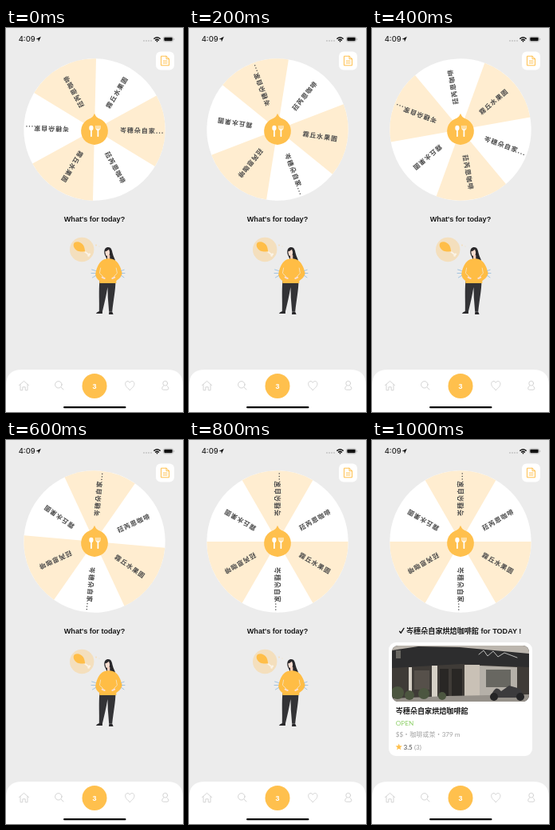
Write an HTML page that moves like this. It is 222 px wide and 480 px high and loops after 1.2 s.

```html
<!DOCTYPE html>
<html lang="zh-Hant">
<head>
<meta charset="utf-8">
<title>What's for today?</title>
<style>
html, body { margin: 0; width: 100%; height: 100%; overflow: hidden; background: #ececec; }
svg { display: block; width: 100vw; height: 100vh; }
text { font-family: "Liberation Sans", "Noto Sans CJK TC", "Noto Sans CJK", sans-serif; }
.label { font-size: 8px; font-weight: 700; letter-spacing: .95px; fill: #484848;
  font-family: "Noto Sans CJK TC", "Noto Sans CJK", sans-serif; }
.bold { font-size: 9.1px; font-weight: 700; fill: #1a1a1a; }
.info { font-size: 8.1px; font-family: Lato, "Noto Sans CJK TC", "Noto Sans CJK", sans-serif; }
.line { fill: none; stroke-linecap: round; stroke-linejoin: round; }
</style>
</head>
<body>
<svg viewBox="0 0 222 480">
  <defs>
    <clipPath id="photoClip"><rect x="25" y="257" width="172" height="70" rx="8"/></clipPath>
  </defs>
  <rect width="222" height="480" fill="#ececec"/>

  <!-- status bar -->
  <text x="15.7" y="17.3" font-size="9.4" fill="#222" style="font-family:Inter,sans-serif;font-weight:500">4:09</text>
  <path d="M43.8 10.8L37.4 13.9L40.4 14.3L40.9 17.2Z" fill="#111"/>
  <g fill="#aaa"><circle cx="173" cy="16" r=".8"/><circle cx="176" cy="16" r=".8"/><circle cx="179" cy="16" r=".8"/><circle cx="182" cy="16" r=".8"/></g>
  <path class="line" d="M185.9 13.3Q189.5 10.1 193.1 13.3M187.6 15.1Q189.5 13.4 191.4 15.1" stroke="#111" stroke-width="1.5"/>
  <circle cx="189.5" cy="16.5" r=".9" fill="#111"/>
  <rect x="197.4" y="10.9" width="12.2" height="6.2" rx="1.9" fill="none" stroke="#aaa" stroke-width=".6"/>
  <rect x="198.3" y="11.8" width="10.4" height="4.4" rx="1.1" fill="#111"/>
  <path d="M210.6 12.9v2.2" stroke="#aaa" stroke-width=".8"/>

  <g id="wheel"></g>

  <!-- hub -->
  <path d="M111 106.8C112.5 110.5 113.5 111.8 117 113.2A16.9 16.9 0 1 1 105 113.2C108.5 111.8 109.5 110.5 111 106.8Z" fill="#ffc04d"/>
  <ellipse cx="106.9" cy="125" rx="2.6" ry="3.3" fill="#fff"/>
  <path class="line" d="M106.9 127V135.2M115.4 127V135.2" stroke="#fff" stroke-width="1.7"/>
  <path class="line" d="M113 122.2V125Q113 127.4 115.4 127.4T117.8 125V122.2M115.4 122.2V127" stroke="#fff" stroke-width="1.1"/>

  <!-- list button -->
  <rect x="188" y="29.5" width="23" height="23" rx="6" fill="#fff"/>
  <path class="line" d="M194.9 35.2H201L204.5 38.7V46.8H194.9ZM201 35.2V38.7H204.5M197.2 41.2H202.2M197.2 43.8H202.2" stroke="#ffc04d" stroke-width="1"/>

  <g id="idle">
    <text class="bold" x="111" y="241.7" text-anchor="middle">What's for today?</text>
    <circle cx="95.2" cy="277" r="15.2" fill="#f4dfbd"/>
    <path class="line" d="M97.5 278.5L104 283.5" stroke="#fbf3e6" stroke-width="1.8"/>
    <circle cx="104.8" cy="282.7" r="1.3" fill="#fbf3e6"/><circle cx="103.6" cy="284.4" r="1.3" fill="#fbf3e6"/>
    <path d="M86.3 268C89.5 266 94.5 267.6 97 271.5C98.8 274.5 98.6 277 99.4 279.6C96 279 92 280.3 88 277.4C84.4 274.6 83.6 270 86.3 268Z" fill="#ffbe48"/>
    <circle cx="113" cy="271.6" r="1" fill="#f4dfbd"/><circle cx="117" cy="273" r=".6" fill="#f4dfbd"/>

    <!-- person -->
    <path d="M123.3 281C123 276.5 125 274 128.2 274C132.4 274 133 278.5 133.8 282C134.6 286 137 288.5 137.2 292H126.5C127 287 123.7 285 123.3 281Z" fill="#29282b"/>
    <path d="M124.2 279.5Q127 279 129 276.8Q130.8 280 129.8 283.4Q127.6 286.3 125.2 284Z" fill="#f9ddd0"/>
    <path d="M127 284H130.3V290H127Z" fill="#f3cdbb"/>
    <path d="M117.3 316.5H137.4C137.4 328 134.8 339 133.2 354.5H129.2L127.8 337L127.4 324C125.6 335 123.2 345 121 354H116.8C117.2 341 116.2 330 117.3 316.5Z" fill="#333336"/>
    <path d="M117 354H120.9V357H112.8Q114 355 117 354ZM129.4 354.5H133.1L134.6 358H129Z" fill="#29282b"/>
    <path d="M123 289.3Q129 287.3 135.2 289.4C140.5 291.6 144 299 145.6 306C146 310 141 314.5 138.3 316V319H117.3V316C114.5 314 111.6 310.5 112.3 306.5C113.8 299 117.5 291.3 123 289.3Z" fill="#ffbd45"/>
    <path class="line" d="M118.6 300L117.4 306.5L121.6 310.5M138.2 300L139.4 306.5L135.4 310.5" stroke="#f6dfb3" stroke-width="1"/>
    <path class="line" d="M120.6 311.6L123.6 313M136.2 311.6L133.4 313" stroke="#f9ddd0" stroke-width="2"/>
    <path class="line" d="M112.4 303.5L107.6 302M112 306.5H107M112.6 309.5L108.4 312M144.6 303.5L148.2 302.2M145.4 306.5H149M144.6 309.5L148 311.8" stroke="#8fb9dd" stroke-width=".8"/>
  </g>

  <g id="result">
    <path class="line" d="M34.6 239.2L36.3 241.2L40 235.4" stroke="#1a1a1a" stroke-width="1.4"/>
    <text class="bold" x="43" y="241.7"><tspan class="shop"></tspan> for TODAY !</text>
    <rect x="21" y="253" width="180" height="142" rx="9" fill="#fff"/>
    <g clip-path="url(#photoClip)">
      <rect x="25" y="257" width="172" height="70" fill="#3f3b37"/>
      <path d="M25 257H197V268L100 262L25 266Z" fill="#bcb6ae"/>
      <path d="M25 263L58 258L110 259L197 267V284L112 280L25 285Z" fill="#2d2d2e"/>
      <path class="line" d="M134 268L140 263L145 270L152 264L158 271L166 266L182 272" stroke="#cfcfcc" stroke-width=".9"/>
      <path d="M30 263H36V273H30Z" fill="#696762"/>
      <path d="M46 284H50V318H46ZM75 282H82V325H75Z" fill="#d6d0c6"/>
      <path d="M53 288H72V312H53Z" fill="#56504a"/>
      <path d="M85 286H96V321H85ZM100 286H113V321H100Z" fill="#292725"/>
      <path d="M116 281H135V327H116Z" fill="#c9c1b6"/>
      <path d="M135 282L182 284V321H135Z" fill="#b5b0a8"/>
      <path d="M143 287H174V309H143Z" fill="#686761"/>
      <path d="M25 323L95 320L197 318V327H25Z" fill="#96918a"/>
      <g fill="#4c5640"><circle cx="32" cy="316" r="8"/><circle cx="47" cy="319" r="6"/><circle cx="65" cy="317" r="7"/><circle cx="88" cy="320" r="5"/></g>
      <path d="M151 316Q156 306 162 314L172 307L186 311L191 322H148Z" fill="#3c3b3d"/>
      <circle cx="153" cy="321" r="5" fill="#242426"/><circle cx="186" cy="321" r="5" fill="#242426"/>
    </g>
    <text class="bold shop" x="29.7" y="341.8"></text>
    <text class="info" x="29.7" y="357" fill="#8fd06a" style="font-size:8.3px">OPEN</text>
    <text class="info" x="29.7" y="371" fill="#a0a0a0">$$・咖啡或茶・379 m</text>
    <path d="M33.7 379.6L34.8 382.3L37.8 382.5L35.5 384.4L36.3 387.3L33.7 385.7L31.1 387.3L31.9 384.4L29.6 382.5L32.6 382.3Z" fill="#ffc04d"/>
    <text class="info" x="39.5" y="387" fill="#444">3.5 <tspan fill="#999">(3)</tspan></text>
  </g>

  <!-- tab bar -->
  <path d="M0 480V447Q0 427 20 427H202Q222 427 222 447V480Z" fill="#fff"/>
  <g class="line" stroke="#d4d4d4" stroke-width="1">
    <path d="M16.5 446.6L22.5 441.4L28.5 446.6M18 445.6V452.8H20.8V448.8H24.2V452.8H27V445.6"/>
    <circle cx="65.8" cy="445.8" r="4.2"/><path d="M69 449L72 452"/>
    <path d="M155.3 452.5C151.5 449.5 149.7 447.3 149.7 444.8C149.7 441 154 440.5 155.3 443.4C156.6 440.5 160.9 441 160.9 444.8C160.9 447.3 159.1 449.5 155.3 452.5Z"/>
    <circle cx="199.7" cy="444.2" r="2.9"/><path d="M197.5 447.6Q195.7 448.4 195.7 450.4Q195.7 452.2 197.5 452.2H202Q203.8 452.2 203.8 450.4Q203.8 448.4 202 447.6"/>
  </g>
  <circle cx="111" cy="447.5" r="15.5" fill="#ffc04d"/>
  <text x="111" y="450.8" text-anchor="middle" font-size="9" font-weight="700" fill="#fff">3</text>
  <rect x="72" y="472.9" width="78.5" height="2.4" rx="1.2" fill="#000"/>
</svg>
<script>
const STEP = 200;
const ANGLES = [1.3, 249, 200, 275, 270, 270];
const LABELS = ["岑穗朵自家...", "菈芮恩咖啡", "霧丘水果園"];
const SHOP = "岑穗朵自家烘焙咖啡館";
const RADIUS = 88.7;
const byId = id => document.getElementById(id);
const wheel = byId("wheel"), idle = byId("idle"), result = byId("result");

function buildWheel() {
  const x = RADIUS * Math.cos(Math.PI / 6), y = RADIUS / 2;
  const slice = `<path d="M0 0L${x} ${-y}A${RADIUS} ${RADIUS} 0 0 1 ${x} ${y}Z" fill="#ffedd0"/>`;
  let parts = `<circle r="${RADIUS}" fill="#fff"/>`;
  for (let i = 0; i < 6; i++) {
    parts += `<g transform="rotate(${i * 60})">${i % 2 ? "" : slice}
      <text class="label" x="32" y="2.9">${LABELS[i % 3]}</text></g>`;
  }
  wheel.innerHTML = parts;
}

function render(time) {
  const step = Math.floor(time / STEP) % ANGLES.length;
  const done = step === ANGLES.length - 1;
  wheel.setAttribute("transform", `translate(111 127) rotate(${ANGLES[step]})`);
  idle.style.display = done ? "none" : "";
  result.style.display = done ? "" : "none";
}

buildWheel();
document.querySelectorAll(".shop").forEach(el => el.textContent = SHOP);
const start = performance.now();
function tick() {
  render(performance.now() - start);
  requestAnimationFrame(tick);
}
tick();
</script>
</body>
</html>
```
